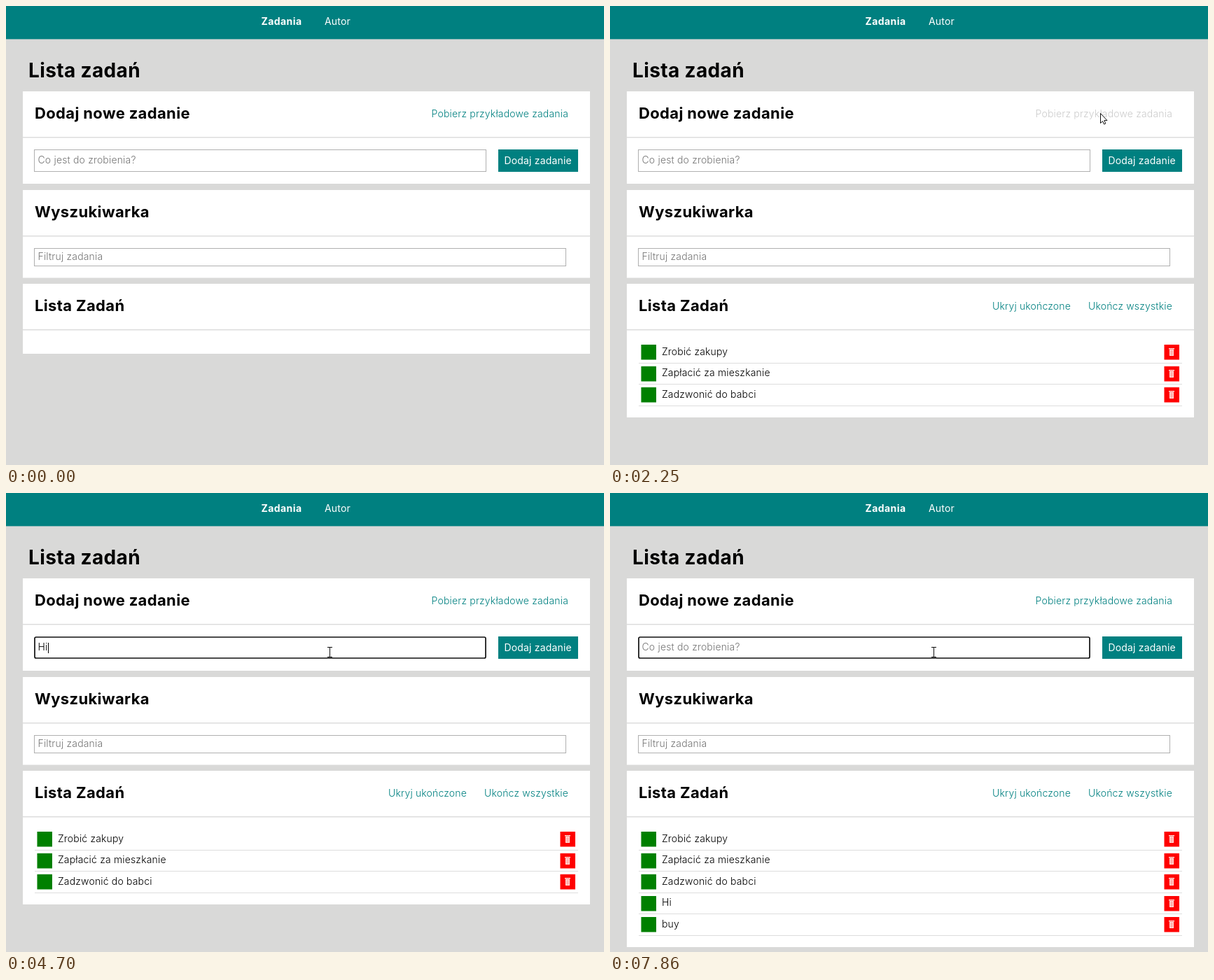
Recreate the animation shown at these times as an HTML page. Size 854x656 px, loop 8 s.

```html
<!DOCTYPE html>
<html lang="pl">
<head>
<meta charset="utf-8">
<title>Lista zadań</title>
<style>
  html, body { margin: 0; width: 100%; height: 100%; overflow: hidden; background: #d9d9d8; }
  svg { display: block; }
  text {
    font: 300 14px Inter, "Open Sans", sans-serif;
    font-optical-sizing: none;
    letter-spacing: .012em;
    white-space: pre;
  }
  .h1 { font-size: 28px; font-weight: 700; letter-spacing: .013em; }
  .h2 { font-size: 22px; font-weight: 700; letter-spacing: .016em; }
  .white { fill: #fff; font-weight: 400; }
  .bold { font-weight: 700; letter-spacing: .03em; }
  .link { fill: #008080; }
  .hint { fill: #757575; }
  .end { text-anchor: end; }
</style>
</head>
<body>
<svg id="stage" width="854" height="656" viewBox="0 0 854 656"></svg>
<script>
const LOOP = 8000;
const ROW = 30.4;
const stage = document.getElementById('stage');

function add(tag, attrs, parent = stage) {
  const node = document.createElementNS('http://www.w3.org/2000/svg', tag);
  for (const key in attrs) node.setAttribute(key, attrs[key]);
  return parent.appendChild(node);
}
const rect = (x, y, width, height, fill, parent) =>
  add('rect', { x, y, width, height, fill }, parent);
function label(x, y, words, cls = '', parent) {
  const node = add('text', { x, y, class: cls }, parent);
  node.textContent = words;
  return node;
}
const frame = (x, y, width, height) => add('rect', {
  x: x + .5, y: y + .5, width: width - 1, height: height - 1, fill: '#fff', stroke: '#b0b0b0'
});
const show = (node, on) => node.setAttribute('visibility', on ? 'visible' : 'hidden');

function card(y, height, title) {
  const back = rect(24, y, 810, height, '#fff');
  rect(24, y + 65, 810, 1.5, '#ddd');
  label(41, y + 39, title, 'h2');
  return back;
}

// Page
rect(0, 0, 854, 656, '#d9d9d8');
rect(0, 0, 854, 47.4, '#008080');
label(364.5, 27, 'Zadania', 'white bold');
label(455, 27, 'Autor', 'white');
label(32, 102, 'Lista zadań', 'h1');

card(122, 132, 'Dodaj nowe zadanie');
const fetchLink = label(803, 159, '', 'end');
const field = frame(40, 205, 646, 32);
const focusRing = add('rect', {
  x: 41, y: 206, width: 644, height: 30, rx: 2, fill: '#fff', stroke: '#101010', 'stroke-width': 1.7
});
const entry = label(45.5, 225, '');
const caret = rect(45, 214, 1, 15, '#000');
rect(703, 205, 114, 32, '#008080');
label(711.5, 225.5, 'Dodaj zadanie', 'white');

card(263, 125.5, 'Wyszukiwarka');
frame(40, 346, 760, 26);
label(45.5, 363, 'Filtruj zadania', 'hint');

const listCard = card(397, 100, 'Lista Zadań');
const listLinks = add('g', {});
label(658, 434, 'Ukryj ukończone', 'link end', listLinks);
label(803, 434, 'Ukończ wszystkie', 'link end', listLinks);

const rows = ['Zrobić zakupy', 'Zapłacić za mieszkanie', 'Zadzwonić do babci', 'Hi', 'buy']
  .map((words, i) => {
    const y = Math.round(480 + ROW * i);
    const top = Math.round(484.3 + ROW * i);
    const row = add('g', {});
    rect(44.5, top, 21.5, 21.5, '#008000', row);
    label(74, y + 19, words, '', row);
    rect(791.5, top, 21.5, 21.5, '#f00', row);
    rect(798, top + 5, 8, 1.5, '#ffe4e0', row);
    rect(799, top + 7, 6, 9, '#ffe4e0', row);
    add('path', { d: `M801 ${top + 8}v7M803 ${top + 8}v7`, stroke: '#f66', 'stroke-width': .8 }, row);
    rect(41, y + 30, 776, 1, '#ddd', row);
    return row;
  });

// Pointer shapes, each with its hot spot at 0,0
const halo = add('circle', { r: 10, fill: '#ff3', 'fill-opacity': .75 });
const pointer = {
  arrow: add('path', {
    d: 'M.5 .5V14.5L3.6 11.6 5.6 16 7.8 15 5.8 10.6H10Z', fill: '#fff', stroke: '#111'
  }),
  hand: add('path', {
    d: 'M-1 1Q0-.6 1 1V6L7 7.5Q9 8 8.7 10L7.5 16H-.5L-5 10Q-5 8-3 8.5L-1 10Z',
    fill: '#fff', stroke: '#111'
  }),
  beam: add('path', {
    d: 'M-4-6.5H3M-.5-6.5V7.5M-4 7.5H3', fill: 'none', stroke: '#111'
  })
};

// time, x, y
const path = [
  [320, 819, 612], [450, 812, 450], [580, 796, 305], [650, 783, 238], [720, 758, 205],
  [790, 737, 184], [910, 716, 164], [1110, 707, 153], [1400, 704, 152], [1720, 702, 152],
  [2240, 702, 152], [2250, 700, 153], [2360, 698, 156], [2480, 665, 182], [2600, 600, 222],
  [2700, 530, 256], [2770, 478, 256], [2850, 460, 231], [2980, 460, 230],
  [3050, 461, 229], [3120, 463, 227]
];
// time, typed words, caret position (0 hides it)
const typing = [
  [0, '', 0], [2850, '', 45], [3510, '', 0], [3970, '', 45], [4440, 'H', 57], [4700, 'Hi', 60],
  [4960, '', 45], [5230, '', 0], [5490, 'h', 55], [5620, 'he', 63], [6150, 'h', 0],
  [6350, '', 0], [6680, '', 45], [7010, 'b', 55], [7140, 'bu', 63], [7340, 'buy', 72],
  [7670, '', 45], [7860, '', 0]
];
// time, visible rows
const listing = [[0, 0], [2250, 3], [4960, 4], [7670, 5]];

const latest = (steps, t) => steps.findLast(step => step[0] <= t);
const within = (t, from, to) => t >= from && t < to;

function snap(t) {
  for (const [from, to, count] of [[320, 1110, 12], [1180, 1720, 8], [2360, 3050, 11]]) {
    if (!within(t, from, to)) continue;
    const step = (to - from) / count;
    return from + Math.floor((t - from) / step + 1e-6) * step;
  }
  return t;
}

function position(t) {
  const i = path.findIndex(p => p[0] > t);
  if (i < 0) return path.at(-1).slice(1);
  const [a, b] = [path[i - 1], path[i]];
  const k = (t - a[0]) / (b[0] - a[0]);
  return [a[1] + (b[1] - a[1]) * k, a[2] + (b[2] - a[2]) * k];
}

function render(t) {
  const loading = within(t, 1310, 2250);
  const disabled = within(t, 1310, 2400);
  const focused = t >= 2850;
  const moving = t >= 320;
  const [x, y] = moving ? position(snap(t)) : [0, 0];

  const overLink = moving && !disabled && x > 606 && x < 804 && y > 145 && y < 164;
  const overButton = x > 703 && x < 817 && y > 205 && y < 237;
  const overField = x > 40 && x < 686 && y > 205 && y < 237;
  const kind = overField ? 'beam' : overLink || overButton ? 'hand' : 'arrow';
  for (const name in pointer) {
    show(pointer[name], moving && name === kind);
    pointer[name].setAttribute('transform', `translate(${Math.round(x)} ${Math.round(y)})`);
  }
  show(halo, within(t, 1180, 1380) || within(t, 2850, 3050));
  halo.setAttribute('cx', x - 2);
  halo.setAttribute('cy', y);

  fetchLink.textContent = loading ? 'Ładowanie...' : 'Pobierz przykładowe zadania';
  fetchLink.setAttribute('fill', disabled ? '#ccc' : overLink ? '#009a9a' : '#008080');

  const [, words, caretX] = latest(typing, t);
  entry.textContent = words || 'Co jest do zrobienia?';
  entry.setAttribute('class', words ? '' : 'hint');
  caret.setAttribute('x', caretX);
  show(caret, caretX > 0);
  show(field, !focused);
  show(focusRing, focused);

  const count = latest(listing, t)[1];
  rows.forEach((row, i) => show(row, i < count));
  show(listLinks, count > 0);
  listCard.setAttribute('height', Math.round(100 + ROW * count));
}

const start = performance.now();
function tick() {
  render((performance.now() - start) % LOOP);
  requestAnimationFrame(tick);
}
tick();
</script>
</body>
</html>
```
